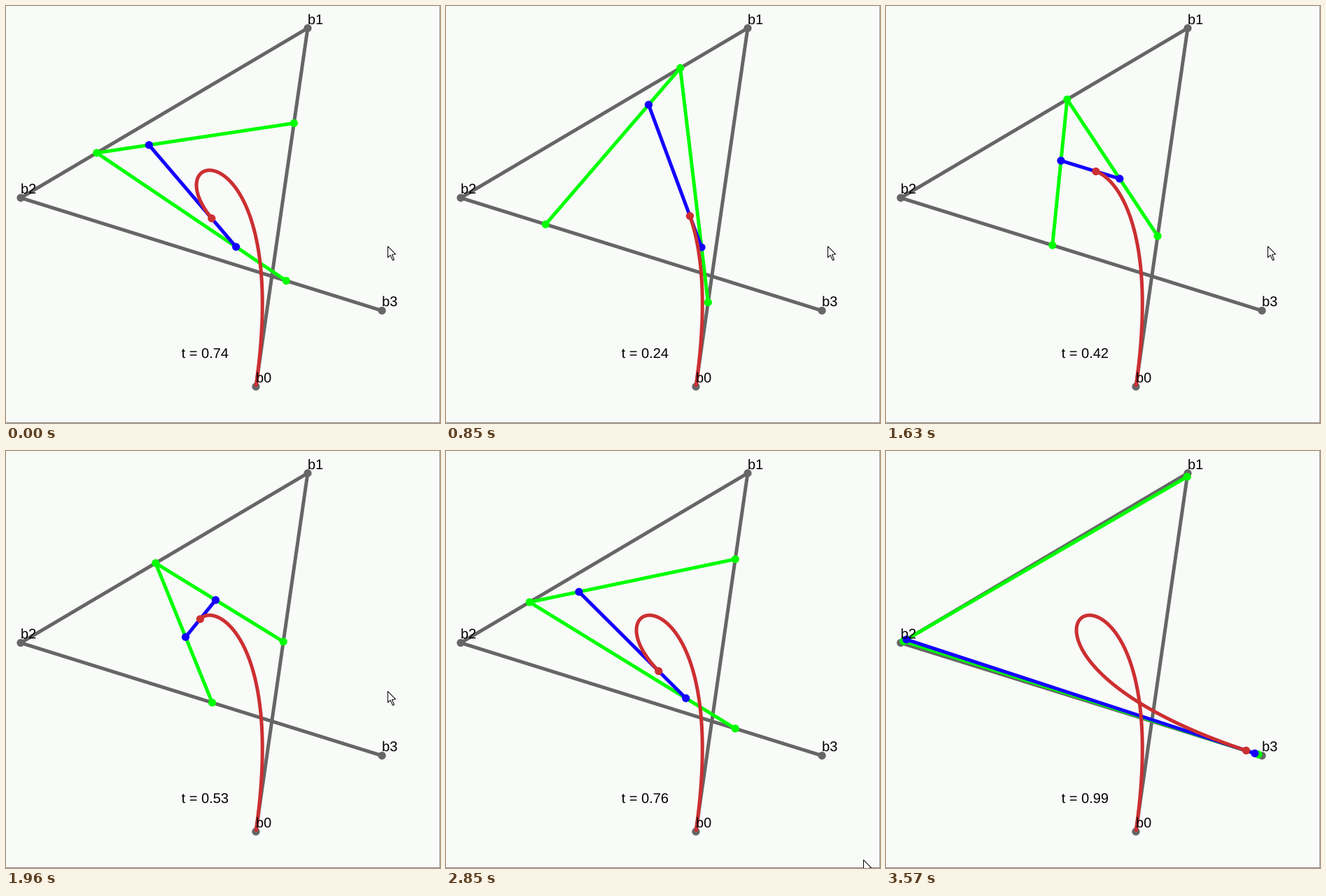
A matplotlib script for the animation above (3630 ms loop, 620 by 596 pixels).

```python
import math

import numpy as np
import matplotlib.pyplot as plt
from matplotlib.animation import FuncAnimation
from matplotlib.patches import Circle, PathPatch, Polygon
from matplotlib.path import Path
from matplotlib.textpath import TextPath

W, H, DPI = 620, 596, 100
LOOP, TICK = 3630, 10
PX = 72 / DPI

plt.rcParams.update({"font.family": "Liberation Sans", "path.snap": False})

BACK, GRAY = "#f9fbf9", "#666666"
GREEN, BLUE, RED = "#00ff00", "#1400ff", "#cc2f31"

# Control points b0..b3 in pixels, y pointing down
B = np.array([(357, 544), (431, 31.7), (21, 274.2), (537.1, 435.4)])

# (ms, parameter): the sweep restarts at 60 ms and pauses at 2170 ms
KEYS = np.array([(0, .735), (60, .015), (460, .145), (850, .235), (1280, .325),
                 (2170, .592), (2340, .592), (2350, .605), (2850, .76), (3570, .99)])
STEP = 0.005
PERIOD = 52  # usual time between two picture updates

# The pointer rests, then leaves through the bottom edge
POINTER_PATH = np.array([(545.5, 343.5), (640, 480), (596.5, 584.5)])
POINTER_MOVE, POINTER_GONE = (2400, 2850), 2910
POINTER = np.array([(0, 0), (0, 16), (3.5, 12.6), (7, 20), (9, 19), (6, 12), (11, 11.3)])

fig = plt.figure(figsize=(W / DPI, H / DPI), dpi=DPI, facecolor=BACK)
ax = fig.add_axes([0, 0, 1, 1])
ax.set_xlim(0, W)
ax.set_ylim(H, 0)
ax.axis("off")


def add_line(color, points, z, width=5):
    line, = ax.plot(*np.transpose(points), color=color, lw=width * PX, zorder=z,
                    solid_capstyle="butt", solid_joinstyle="round")
    return line


def add_dots(color, points, z):
    return [ax.add_patch(Circle(p, 5.6, fc=color, ec="none", zorder=z))
            for p in points]


def text_path(x, baseline, text):
    glyphs = TextPath((0, 0), text, size=20)
    return Path(glyphs.vertices * (1, -1) + (x, baseline), glyphs.codes)


def add_text(x, baseline, text):
    return ax.add_patch(PathPatch(text_path(x, baseline, text),
                                  fc="black", ec="none", zorder=9))


def between(points, t):
    """One de Casteljau level: split every leg of the polyline at t."""
    return points[:-1] * (1 - t) + points[1:] * t


def bezier(points, t):
    t = np.asarray(t)[..., None]
    while len(points) > 1:
        points = [p * (1 - t) + q * t for p, q in zip(points, points[1:])]
    return points[0]


def update_times(keys):
    """Spread updates evenly between key moments, on the 10 ms grid."""
    spans = [np.linspace(a, b, max(1, round((b - a) / PERIOD)) + 1)
             for a, b in zip(keys, keys[1:])]
    return np.unique(np.round(np.concatenate(spans), -1))


add_line("#a6a6a6", [(W - .5, 0), (W - .5, H)], 0, 1)
add_line("#8c8c8c", [(0, H - .5), (W, H - .5)], 0, 1)

add_line(GRAY, B, 1)
add_dots(GRAY, B, 2)
for i, (x, y) in enumerate(B):
    add_text(x, round(y - 6.1), f"b{i}")

levels = [(add_line(color, B[:n], z), add_dots(color, B[:n], z + 1))
          for color, n, z in ((GREEN, 3, 3), (BLUE, 2, 5))]
curve = add_line(RED, B[:1], 7)
tip, = add_dots(RED, B[:1], 8)
label = add_text(250.7, 503, "t")
pointer = ax.add_patch(Polygon(POINTER, closed=True, fc="white", ec="black",
                               lw=PX, joinstyle="round", zorder=10))

UPDATES = update_times(KEYS[:, 0])


def draw(frame):
    now = UPDATES[UPDATES <= frame * TICK].max()
    t = round(np.interp(now, *KEYS.T) / STEP) * STEP

    points = B
    for line, dots in levels:
        points = between(points, t)
        line.set_data(*points.T)
        for dot, p in zip(dots, points):
            dot.center = p

    # The traced curve trails the construction by one step
    trace = bezier(B, np.linspace(0, t - STEP, 120))
    curve.set_data(*trace.T)
    tip.center = trace[-1]
    percent = math.floor(t * 100 + .5 + 1e-6)
    label.set_path(text_path(250.7, 503, f"t = {percent / 100:.2f}"))

    u = np.interp(now, POINTER_MOVE, (0, 1))
    pointer.set_xy(POINTER + bezier(POINTER_PATH, u))
    pointer.set_visible(now < POINTER_GONE)


anim = FuncAnimation(fig, draw, frames=LOOP // TICK, interval=TICK,
                     init_func=lambda: draw(0), repeat=True,
                     repeat_delay=0, blit=False)
plt.show()
```
